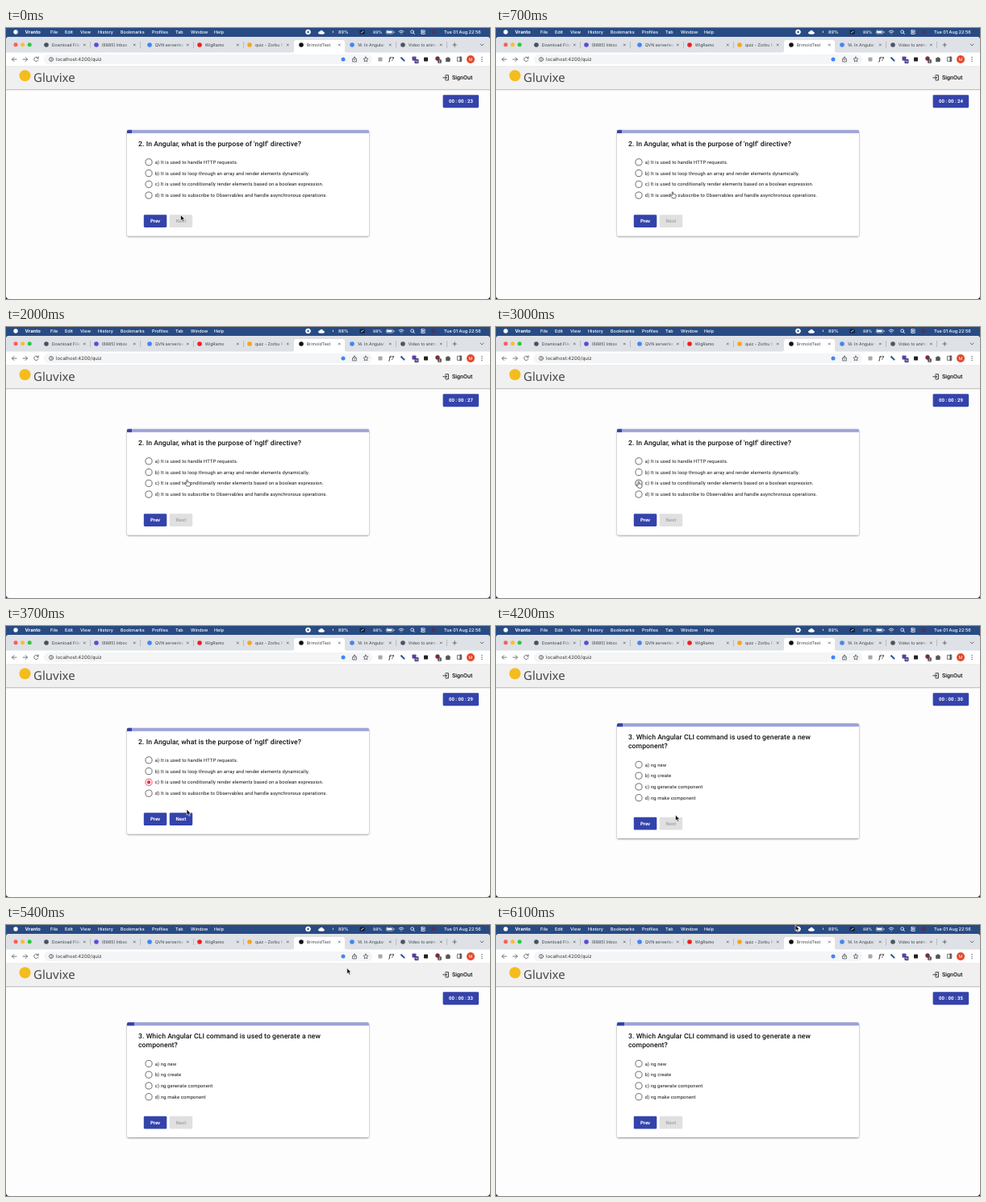
Recreate the animation shown at these times as an HTML page. Size 600 by 337 pixels, loop 6200 ms.

```html
<!DOCTYPE html>
<html lang="en">
<head>
<meta charset="utf-8">
<title>Quiz</title>
<style>
html, body { margin: 0; width: 100%; height: 100%; overflow: hidden; background: #111; }
svg { display: block; width: 600px; height: 337px; }
text { font-family: Roboto, sans-serif; text-rendering: geometricPrecision; white-space: pre; }
.ui text { font-family: Inter, sans-serif; }
.mid { font-weight: 500; }
.line { fill: none; stroke-linecap: round; stroke-linejoin: round; }
</style>
</head>
<body>
<svg id="stage" viewBox="0 0 600 337" xmlns="http://www.w3.org/2000/svg">
  <defs>
    <filter id="shadow" x="-10%" y="-15%" width="120%" height="135%">
      <feDropShadow dx="0" dy="1" stdDeviation="1.3" flood-opacity=".45"/>
    </filter>
    <linearGradient id="fade">
      <stop offset="0" stop-color="#dee1e6" stop-opacity="0"/>
      <stop offset="1" stop-color="#dee1e6"/>
    </linearGradient>
    <clipPath id="round"><rect x="150" y="0" width="300" height="150" rx="2"/></clipPath>
  </defs>
  <rect width="600" height="30" fill="#284b84"/>
  <rect y="11" width="600" height="326" rx="4" fill="#fdfdfd"/>
  <rect y="76" width="600" height="1" fill="#c6c6c6"/>
  <rect y="77" width="600" height="1" fill="#eee"/>
  <rect y="48" width="600" height="28" fill="#f1f0f1"/>
  <g class="ui" id="window">
    <path d="M0 31V15q0-4 4-4h592q4 0 4 4v16z" fill="#dee1e6"/>
    <rect y="30.5" width="600" height="17.5" fill="#fff"/>
    <path d="M354 31q3 0 3-3V18q0-3 3-3h57q3 0 3 3v10q0 3 3 3z" fill="#fff"/>
    <rect x="47" y="32.7" width="407" height="12.4" rx="6.2" fill="#f4f5f6"/>
    <rect y="47.6" width="600" height=".5" fill="#d5d7da"/>
    <text x="62" y="41" font-size="6" fill="#333">localhost:4200/quiz</text>
  </g>
  <g id="icons" class="line" stroke="#505458" stroke-width=".8">
    <path d="M13 39H7.5m2.4-2.5L7.5 39l2.4 2.5M21 39h5.5m-2.4-2.5 2.4 2.5-2.4 2.5"/>
    <path d="M39.8 37.4a2.7 2.7 0 1 0 .2 2.4M40.2 35.8v2h-2"/>
    <circle cx="56" cy="39" r="2.5"/><path d="M56 38.8v1.5M56 37.6v.1"/>
    <path d="M430.6 38.3h-1v3.6h4.8v-3.6h-1M432 40v-4m-1.4 1.3L432 36l1.4 1.3"/>
    <path d="m446 36 .9 1.9 2.1.3-1.5 1.5.3 2.1-1.8-1-1.8 1 .3-2.1-1.5-1.5 2.1-.3z"/>
    <path d="M554 21h4.4m-2.2-2.2v4.4M588 20l2 2 2-2"/>
    <rect x="559.8" y="36.3" width="5" height="5"/><path d="M563.5 36.3v5" stroke-width="2"/>
    <path d="M590 36.5v.1M590 39v.1M590 41.5v.1" stroke-width="1.3"/>
    <path d="M545.8 37.6h1.5v-.8q.7-1 1.4 0v.8h1.5v1.4q1 .6 0 1.3v1.4h-4.4z" fill="#505458"/>
  </g>
  <g id="status" class="line" stroke="#fff" stroke-width=".8">
    <circle cx="374.5" cy="5" r="2.9" fill="#fff"/>
    <rect x="373.4" y="3.9" width="2.2" height="2.2" rx=".4" fill="#284b84" stroke="none"/>
    <path d="M388.7 7.3q-1.8-.2-1.2-1.8.5-1 1.6-.8.8-1.9 2.7-1.3 1.4.5 1.3 1.7 1.7.1 1.5 1.4-.2.8-1.2.8z" fill="#fff"/>
    <rect x="438.5" y="2.4" width="6.5" height="5.4" rx="1.2" fill="#14243f" stroke="none"/>
    <path d="m440.3 6 2.8-1.8M405.4 4v1.6"/>
    <rect x="471.3" y="3.2" width="8.6" height="4" rx="1.2" stroke-width=".5"/>
    <rect x="472.2" y="4.1" width="6.3" height="2.2" rx=".5" fill="#fff" stroke="none"/>
    <path d="M481 4.7v1M487 4.2q3-2.7 6 0M488.2 5.7q1.8-1.5 3.6 0M490 7.2v.1"/>
    <circle cx="503.6" cy="4.7" r="1.9"/><path d="m505 6.2 1.5 1.5"/>
    <rect x="514.5" y="2.8" width="5" height="1.8" rx=".9"/><rect x="514.5" y="5.7" width="5" height="1.8" rx=".9"/>
  </g>
  <circle cx="530" cy="5" r="2.7" fill="#4a3560"/>
  <circle cx="23.5" cy="59.3" r="7" fill="#f4bd1d"/>
  <text x="34" y="67.2" font-size="15" fill="#484848" style="font-family:'Noto Sans',sans-serif">Gluvixe</text>
  <path class="line" d="M545 58.7h3.4v6.2H545M541.8 61.8h4.4m-1.7-1.8 1.8 1.8-1.8 1.8" stroke="#222" stroke-width=".9"/>
  <text class="mid" x="553" y="64.4" font-size="7.1" fill="#111">SignOut</text>
  <rect x="541.6" y="83.2" width="44.5" height="16" rx="1.4" fill="#3443ab"/>
  <text id="timer" x="564" y="93.4" font-size="6" font-weight="700" fill="#fff" text-anchor="middle"></text>
  <g id="cards"></g>
  <g id="arrow"><path d="M0 0v7.2l1.7-1.5 1.1 2.6 1.3-.6L3 5.2h2.2z" fill="#111" stroke="#fff" stroke-width=".6"/></g>
  <g id="hand"><path d="M-.7.7Q0-.3.7.7v2.4q.7-.5 1.2.2.8-.4 1.2.3 1-.1 1 .8v1.8q0 1.2-.8 2H-.2Q-1 7-2.6 4.9q0-1.2 1-.7l.9.7z" fill="#fff" stroke="#222" stroke-width=".65" stroke-linejoin="round"/></g>
</svg>
<script>
const $ = id => document.getElementById(id);
const LOOP = 6200, STEP = 100, BLUE = '#3443ab';
const PICK = 3200, TURN = 4100;

function add(parent, tag, attrs, text) {
  const el = document.createElementNS('http://www.w3.org/2000/svg', tag);
  for (const k in attrs) el.setAttribute(k, attrs[k]);
  if (text) el.textContent = text;
  parent.appendChild(el);
  return el;
}
const win = $('window');
const dot = (x, y, r, fill) => add(win, 'circle', { cx: x, cy: y, r, fill });
const box = (x, y, s, fill) => add(win, 'rect', { x: x - s / 2, y: y - s / 2, width: s, height: s, rx: .7, fill });
const label = (x, y, size, fill, text, weight = 400) =>
  add(win, 'text', { x, y, 'font-size': size, fill, 'font-weight': weight }, text);

// Menu bar
dot(12, 5, 2.7, '#fff');
label(23.5, 7.1, 5.9, '#fff', 'Vranto', 700);
[[55, 'File'], [73, 'Edit'], [92, 'View'], [114, 'History'], [142, 'Bookmarks'], [181, 'Profiles'],
 [210, 'Tab'], [229, 'Window'], [258, 'Help'], [543, 'Tue 01 Aug 22:56']]
  .forEach(([x, s]) => label(x, 7.1, 5.5, '#fff', s, 500));
const level = label(412, 7.1, 5.5, '#fff', '89%', 500);
const battery = label(455, 7, 5, '#fff', '89%', 500);

// Tabs
['#fc5b57', '#fdbc2e', '#29c83f'].forEach((c, i) => dot(12 + i * 8.6, 20.8, 2.5, c));
[[50, 'Download Files', '#45525e'], [112, '(6885) Inbox', '#5b4bd6'], [178, 'QVN serverless', '#4285f4'],
 [240, 'WigRamo', '#f21d1d'], [302, 'quiz - Zorbu Fi', '#f8a41c'], [366, 'BrimoldTest', '#111'],
 [429, '14. In Angular', '#4285f4'], [492, 'Video to anima', '#4e5560']]
  .forEach(([x, s, c], i) => {
    dot(x, 21, 2.8, c);
    label(x + 6.7, 23.2, 5.25, '#3c4043', s);
    const end = x + 43;
    if (i !== 5) {
      add(win, 'rect', { x: end - 8, y: 16, width: 8, height: 10, fill: 'url(#fade)' });
      add(win, 'rect', { x: end, y: 16, width: 10, height: 10, fill: '#dee1e6' });
      if (i !== 4) add(win, 'rect', { x: x + 54, y: 17, width: .5, height: 8, fill: '#94989d' });
    }
    add(win, 'path', { d: `M${x + 46} 19.7l2.6 2.6m0-2.6l-2.6 2.6`, stroke: '#555', 'stroke-width': .7 });
  });

// Toolbar
dot(418, 39, 2.5, '#4285f4');
box(464, 39, 5, '#a5a8ac');
label(474.5, 41.2, 7, '#333', 'f?', 600).setAttribute('font-style', 'italic');
add(win, 'path', { d: 'M489.5 36.5l4.6 4.6', stroke: '#27538f', 'stroke-width': 2 });
box(506, 38, 5, '#5b3fa0');
box(509, 41.5, 5, '#35307c');
label(506.9, 43, 3.6, '#fff', '15', 600);
box(520.5, 39, 5, '#222');
dot(535, 38, 2.7, '#7d2c33');
box(537.5, 41.5, 4.6, '#444');
label(536.3, 43, 3.8, '#fff', '2', 600);
dot(576, 39, 5, '#e5482c');
label(576, 41, 5.3, '#fff', 'M').setAttribute('text-anchor', 'middle');

// Question cards
function button(g, x, y, text) {
  const rect = add(g, 'rect', { x, y, width: 28.5, height: 15.8, rx: 1.4, fill: BLUE });
  const name = add(g, 'text', { x: x + 14.2, y: y + 10.1, 'font-size': 6, 'font-weight': 700, 'text-anchor': 'middle', fill: '#fff' }, text);
  return on => {
    rect.setAttribute('fill', on ? BLUE : '#e0e0e0');
    name.setAttribute('fill', on ? '#fff' : '#a9a9a9');
  };
}
function card(top, height, title, options) {
  const g = add($('cards'), 'g', {});
  add(g, 'rect', { x: 150, y: top, width: 300, height, rx: 2, fill: '#fff', filter: 'url(#shadow)' });
  const bar = add(add(g, 'g', { transform: `translate(0 ${top})` }), 'g', { 'clip-path': 'url(#round)' });
  add(bar, 'rect', { x: 150, y: 0, width: 300, height: 4.2, fill: '#9ea4d9' });
  const fill = add(bar, 'rect', { x: 150, y: 0, width: 6, height: 4.2, fill: BLUE });
  title.forEach((s, i) => add(g, 'text', {
    x: 164, y: top + 20.1 + i * 11.2, 'font-size': 8.63, 'font-weight': 500, 'letter-spacing': .08, fill: '#111' }, s));
  const first = top + 40.2 + (title.length - 1) * 11.2;
  const rings = options.map((s, i) => {
    const cy = first + i * 13.75;
    add(g, 'text', { x: 184.7, y: cy + 2.1, 'font-size': 5.88, 'letter-spacing': .125, fill: '#111' }, s);
    return add(g, 'circle', { cx: 177, cy, r: 4.1, fill: 'none', stroke: '#555', 'stroke-width': .85 });
  });
  const by = first + 65.4;
  button(g, 170.8, by, 'Prev');
  const next = button(g, 202.7, by, 'Next');
  next(false);
  return { g, fill, rings, next };
}
const second = card(126.6, 131.9, ["2. In Angular, what is the purpose of 'ngIf' directive?"], [
  'a) It is used to handle HTTP requests.',
  'b) It is used to loop through an array and render elements dynamically.',
  'c) It is used to conditionally render elements based on a boolean expression.',
  'd) It is used to subscribe to Observables and handle asynchronous operations.']);
const third = card(121, 143.1, ['3. Which Angular CLI command is used to generate a new', 'component?'], [
  'a) ng new', 'b) ng create', 'c) ng generate component', 'd) ng make component']);
const ring = second.rings[2];
const cy = ring.getAttribute('cy');
const halo = add(second.g, 'circle', { cx: 177, cy, r: 6, fill: '#000', opacity: .05 });
const mark = add(second.g, 'circle', { cx: 177, cy, r: 2.2, fill: '#e5354b' });

// Pointer stops: time, x, y
const path = [[0, 216.5, 232.5], [400, 217, 231], [1000, 221, 176], [1300, 222.5, 175.8], [1600, 223, 176.5],
  [2000, 224.5, 189.8], [2400, 223, 190.5], [2900, 176.8, 192], [3300, 176.8, 192], [3700, 224, 228],
  [3900, 219, 238], [4150, 219, 238], [4800, 425, 57], [5300, 425, 56], [6100, 371, 0], [6200, 371, 0]];
const ticks = [400, 900, 1400, 1900, 2400, 2900, 3800, 4300, 4800, 5200, 5700, 6100];
const ease = p => p * p * (3 - 2 * p);
const show = (el, on) => el.setAttribute('visibility', on ? 'visible' : 'hidden');

function pointer(t) {
  const i = Math.max(1, path.findIndex(p => p[0] > t));
  const [t0, x0, y0] = path[i - 1], [t1, x1, y1] = path[i];
  const p = ease((t - t0) / (t1 - t0));
  return [x0 + (x1 - x0) * p, y0 + (y1 - y0) * p];
}
function draw(t) {
  const picked = t >= PICK, turned = t >= TURN;
  $('timer').textContent = '00 : 00 : ' + (23 + ticks.filter(k => k <= t).length);
  level.textContent = t >= 900 && t < 2500 ? '88%' : '89%';
  battery.textContent = t >= 900 ? '88%' : '89%';

  second.g.style.display = turned ? 'none' : '';
  third.g.style.display = turned ? '' : 'none';
  third.fill.setAttribute('width', 6 + 3 * ease(Math.min(1, Math.max(0, (t - TURN) / 250))));
  second.next(picked);
  ring.setAttribute('stroke', picked ? '#e5354b' : '#555');
  mark.style.display = picked ? '' : 'none';
  halo.style.display = t >= 2800 && t < 3500 ? '' : 'none';

  const [x, y] = pointer(t);
  const onOption = !turned && x > 170 && x < 400 && y > 161 && y < 214;
  const onNext = picked && !turned && x > 203 && x < 231 && y > 232 && y < 248;
  const hand = onOption || onNext;
  show($('hand'), hand);
  show($('arrow'), !hand);
  $(hand ? 'hand' : 'arrow').setAttribute('transform', `translate(${x} ${y})`);
}
function frame() {
  draw(Math.floor(performance.now() % LOOP / STEP) * STEP);
  requestAnimationFrame(frame);
}
frame();
</script>
</body>
</html>
```
